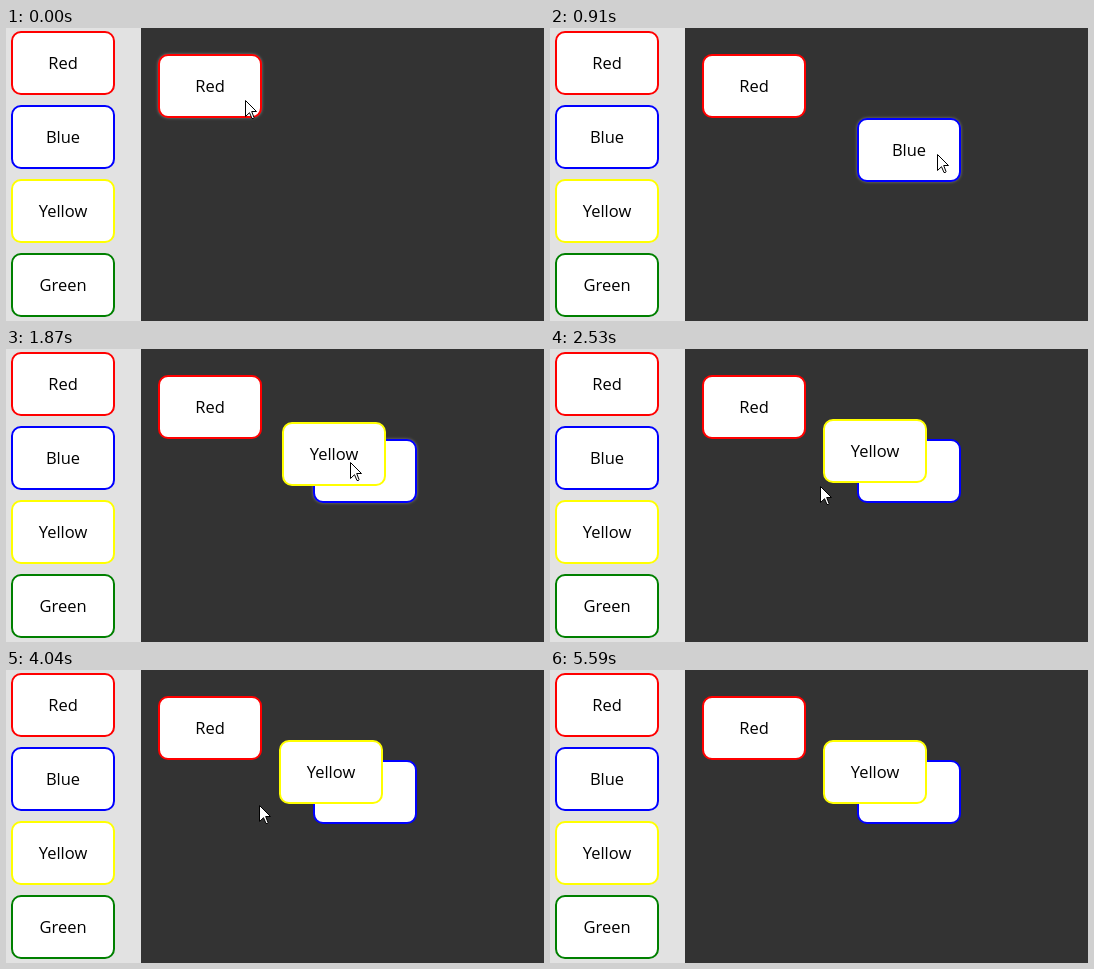
Write an HTML page that moves like this. It is 538x293 px and loops after 6.21 s.

```html
<!DOCTYPE html>
<html lang="en">
<head>
<meta charset="utf-8">
<title>Drag and drop cards</title>
<style>
  html, body { margin: 0; width: 100%; height: 100%; overflow: hidden; background: #333; }
  #sidebar { position: absolute; width: 135px; height: 100%; background: #e2e2e2; }
  .card {
    position: absolute; left: 0; top: 0; box-sizing: border-box; width: 104px; height: 64px;
    border: 2px solid; border-radius: 10px; background: #fff;
    font: 16.5px/60px "Open Sans", "Noto Sans", sans-serif; text-align: center;
  }
  .card span { color: #000; }
  .hover { box-shadow: 0 0 3px #808080; }
  #cursor { position: absolute; left: 0; top: 0; }
</style>
</head>
<body>
<div id="sidebar"></div>
<script>
const LOOP = 6210, STEP = 400 / 3, LEAD = 30;
const WIDTH = 104, HEIGHT = 64;
const MENU = { left: 5, top: 3, pitch: 74 };
const names = ["Red", "Blue", "Yellow", "Green"];

function place(element, x, y) {
  element.style.transform = `translate(${Math.round(x)}px, ${Math.round(y)}px)`;
}

function addCard(name) {
  const card = document.createElement("div");
  card.className = "card";
  card.style.borderColor = name.toLowerCase();
  card.innerHTML = `<span>${name}</span>`;
  document.body.append(card);
  return card;
}

const menuTop = name => MENU.top + MENU.pitch * names.indexOf(name);
names.forEach(name => place(addCard(name), MENU.left, menuTop(name)));

// The pointer is sampled once per step; board cards follow it between grab and drop.
const path = [{ x: 239, y: 72 }];
const board = [];
const now = () => path.length - 1;

function move(x, y, steps) {
  const from = path.at(-1);
  for (let i = 1; i <= steps; i++) {
    const eased = 1 - (1 - i / steps) ** 2;
    path.push({ x: from.x + (x - from.x) * eased, y: from.y + (y - from.y) * eased });
  }
}

function rest(steps) {
  const { x, y } = path.at(-1);
  move(x, y, steps);
}

function grab(name, x = MENU.left, y = menuTop(name)) {
  const hand = path.at(-1);
  board.push({ element: addCard(name), grabbed: now(), dx: hand.x - x, dy: hand.y - y });
}

function drop() {
  board.at(-1).dropped = now();
}

grab("Red", 152, 26);
drop();

move(85, 113, 2);
grab("Blue");
move(99, 116, 2);
move(367, 133, 1);
move(387, 126, 2);
drop();

move(73, 191, 4);
grab("Yellow");
move(351, 123, 2);
move(341, 110, 2);
drop();

// Wander over the dropped cards, then leave.
move(270, 137, 4);
move(319, 112, 3);
move(245, 162, 2);
move(296, 115, 1);
move(225, 159, 3);
rest(1);
move(290, 105, 4);
move(207, 49, 2);
rest(2);
move(308, 79, 1);
move(362, 118, 2);
move(384, 166, 1);

document.body.insertAdjacentHTML("beforeend", `<svg id="cursor" width="13" height="20">
  <path d="M.5.5V16.5L4.5 12.7L7 18.5H8.5L9 17.5L6.7 11.5H11.5Z" fill="#fff" stroke="#000"/></svg>`);
const cursor = document.getElementById("cursor");

function draw(time) {
  const step = Math.floor((time + LEAD) / STEP);
  const hand = path[step];

  for (const card of board) {
    const anchor = path[Math.min(step, card.dropped)];
    card.x = anchor.x - card.dx;
    card.y = anchor.y - card.dy;
    card.element.hidden = step < card.grabbed;
    place(card.element, card.x, card.y);
  }

  const hovered = hand && board.findLast(card => step >= card.dropped &&
    hand.x >= card.x && hand.x < card.x + WIDTH && hand.y >= card.y && hand.y < card.y + HEIGHT);
  board.forEach(card => card.element.classList.toggle("hover", card === hovered));

  cursor.style.visibility = hand ? "visible" : "hidden";
  if (hand) place(cursor, hand.x, hand.y);
}

const start = performance.now();
function tick() {
  draw((performance.now() - start) % LOOP);
  requestAnimationFrame(tick);
}
tick();
</script>
</body>
</html>
```
